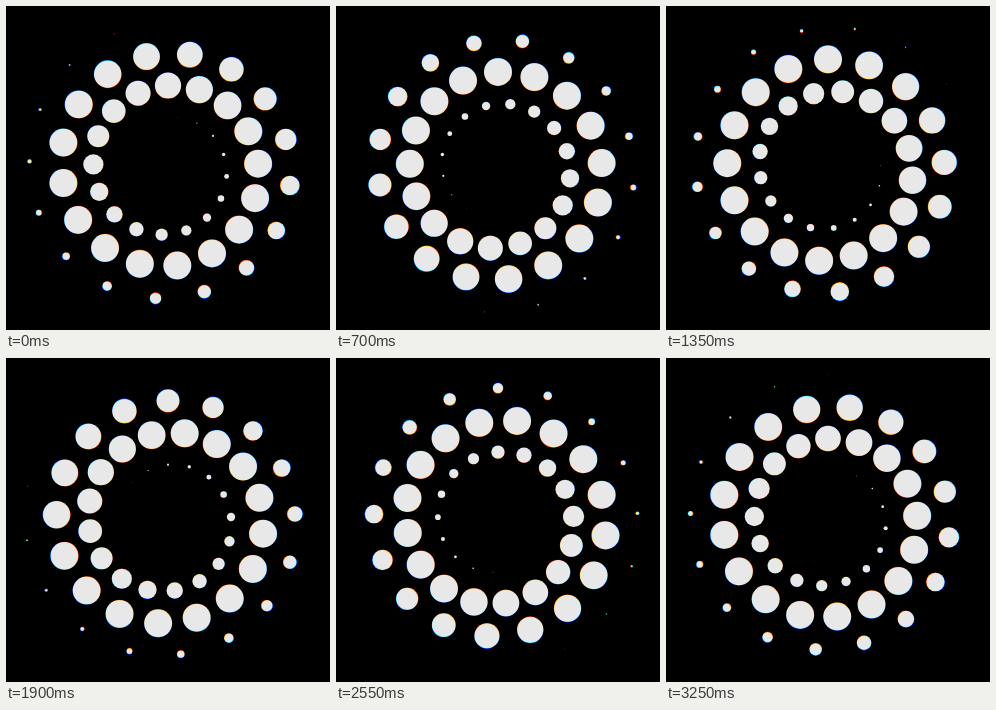
These frames come from a looping animation (324 px wide and 324 px high, 3.3 s). An HTML page with a canvas:

```html
<!DOCTYPE html>
<html lang="en">
<head>
<meta charset="utf-8">
<title>Spiral of dots</title>
<style>
html, body { margin: 0; width: 100%; height: 100%; overflow: hidden; background: #000; }
canvas { display: block; width: 324px; height: 324px; }
</style>
</head>
<body>
<canvas id="stage" width="324" height="324"></canvas>
<script>
const ctx = document.getElementById("stage").getContext("2d");
const LOOP = 3300, TICK = 50, STEP_MS = 100;
const PER_TURN = 16.5, PITCH = 32;       // dots per turn, gap between turns
const START = 82.5, INNER = 48.6, BAND = 100, DOT = 14;
const CHANNELS = [["#e80000", -1], ["#00e800", 0], ["#0000e8", 1]];

function smooth(x) {
  x = Math.min(1, Math.max(0, x));
  return x * x * (3 - 2 * x);
}

// Dots swell on entering the band and shrink on leaving it.
function dotSize(r) {
  const p = (r - INNER) / BAND;
  return DOT * smooth(Math.min(p, 1 - p) / 0.4);
}

function draw(time) {
  const shift = time / STEP_MS;
  ctx.setTransform(1, 0, 0, 1, 0, 0);
  ctx.globalCompositeOperation = "source-over";
  ctx.fillStyle = "#000";
  ctx.fillRect(0, 0, 324, 324);
  ctx.translate(162, 162);
  ctx.globalCompositeOperation = "lighter";
  for (let i = -52; i < 36; i++) {
    const r = START + PITCH * (i + shift) / PER_TURN;
    const size = dotSize(r);
    if (size <= 0) continue;
    const angle = 2 * Math.PI * i / PER_TURN;
    const fringe = 0.6 * (r / 140) ** 2;  // lens-like colour spread
    for (const [color, side] of CHANNELS) {
      const d = r + side * fringe;
      ctx.fillStyle = color;
      ctx.beginPath();
      ctx.arc(d * Math.sin(angle), -d * Math.cos(angle), size, 0, 2 * Math.PI);
      ctx.fill();
    }
  }
}

const begin = performance.now();
function frame() {
  const t = performance.now() - begin;
  draw(Math.floor((t + 4) / TICK) * TICK % LOOP);
  requestAnimationFrame(frame);
}
frame();
</script>
</body>
</html>
```
